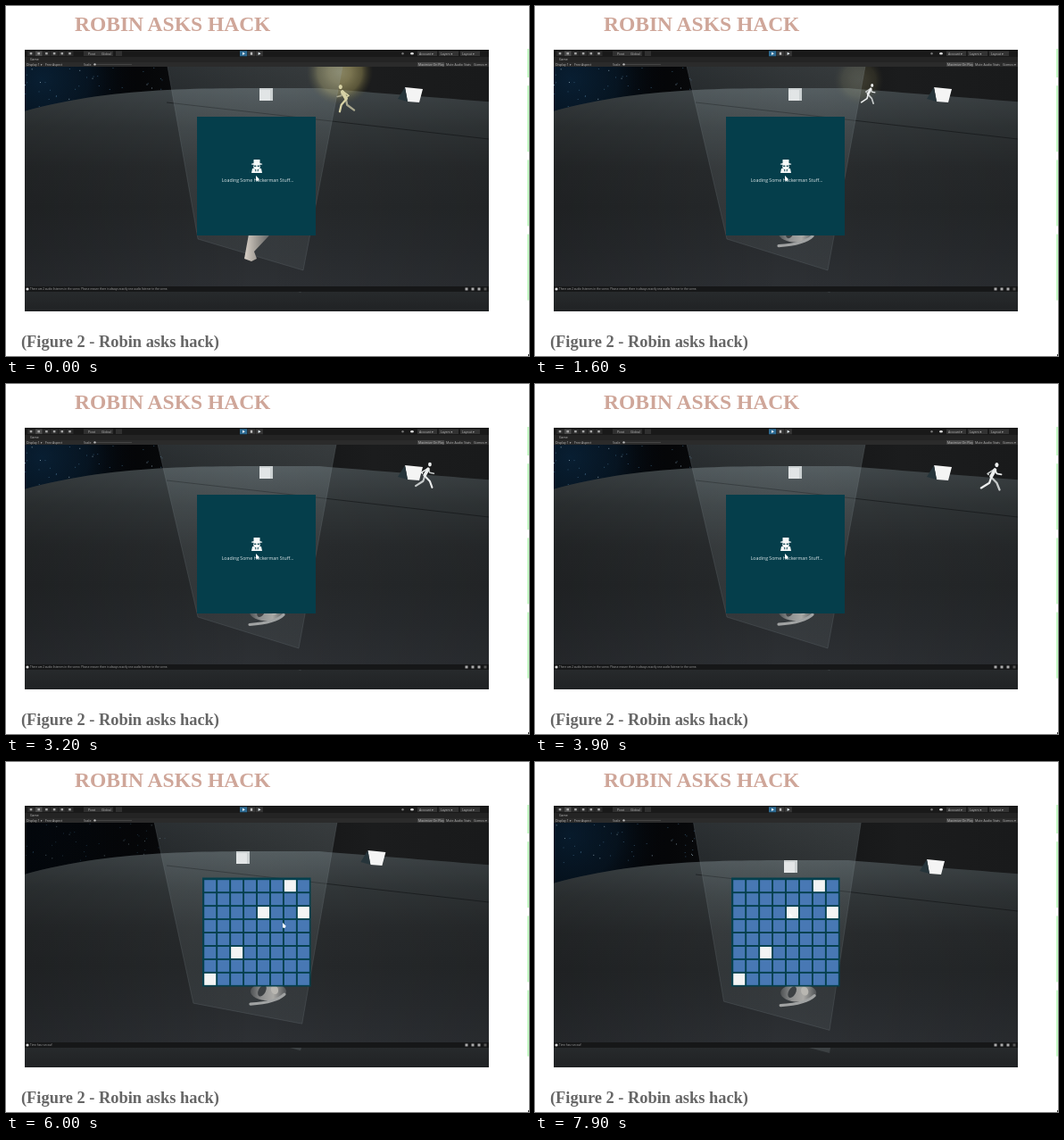
Write an HTML page with a canvas that moves like this. It is 586 px wide and 392 px high and loops after 8 s.

```html
<!DOCTYPE html>
<html lang="en">
<head>
<meta charset="utf-8">
<title>Robin asks hack</title>
<style>
html, body { margin: 0; width: 100%; height: 100%; overflow: hidden; background: #fff; }
canvas { position: absolute; left: 0; top: 0; }
h1, p {
  position: absolute; margin: 0; white-space: nowrap; line-height: 1;
  font-family: "Liberation Serif", Times, serif; font-weight: bold;
}
h1 { left: 77px; top: 8.5px; font-size: 23.5px; color: #cfa699; }
p { left: 17px; top: 366.5px; font-size: 18.4px; color: #666; }
</style>
</head>
<body>
<canvas id="stage" width="586" height="392"></canvas>
<h1>ROBIN ASKS HACK</h1>
<p>(Figure 2 - Robin asks hack)</p>
<script>
const ctx = document.getElementById('stage').getContext('2d');
const LOOP = 8000, GRID_AT = 4900, LEFT = 21, RIGHT = 541, TOP = 68, BOTTOM = 314;
const LIT = ['6,0', '4,2', '7,2', '2,5', '0,7'];
const GREY = '#bdbdbd';

const clamp = v => Math.max(0, Math.min(1, v));

// Eased progress from 0 to 1 between two times
function span(t, from, to) {
  const v = clamp((t - from) / (to - from));
  return v * v * (3 - 2 * v);
}

function rect(x, y, w, h, color) {
  ctx.fillStyle = color;
  ctx.fillRect(x, y, w, h);
}

function trace(points) {
  ctx.beginPath();
  points.forEach(([x, y]) => ctx.lineTo(x, y));
}

function poly(points, fill) {
  trace(points);
  ctx.fillStyle = fill;
  ctx.fill();
}

function line(points, color, width = 1) {
  trace(points);
  ctx.strokeStyle = color;
  ctx.lineWidth = width;
  ctx.stroke();
}

function oval(x, y, rx, ry, fill, turn = 0) {
  ctx.beginPath();
  ctx.ellipse(x, y, rx, ry, turn, 0, 7);
  ctx.fillStyle = fill;
  ctx.fill();
}

function stops(gradient, colors) {
  colors.forEach((c, i) => gradient.addColorStop(i / (colors.length - 1), c));
  return gradient;
}
const down = (y0, y1, ...colors) => stops(ctx.createLinearGradient(0, y0, 0, y1), colors);
const across = (x0, x1, ...colors) => stops(ctx.createLinearGradient(x0, 0, x1, 0), colors);
const halo = (x, y, r, ...colors) => stops(ctx.createRadialGradient(x, y, 0, x, y, r), colors);

function label(text, x, y, size = 3.5, color = GREY) {
  ctx.font = `${size}px "Open Sans", "Noto Sans", sans-serif`;
  ctx.fillStyle = color;
  ctx.fillText(text, x, y);
}

function view(t) {
  const a = span(t, 5300, 6000), b = span(t, 6000, 7900);
  return {
    pan: 21 * b - 26 * a,
    tilt: 8 * a + 10 * b,
    swing: 1 - span(t, 0, 900),
    nebula: 0.65 - 0.6 * a + 0.5 * b,
    mouse: [281 + 30 * a - 25 * b, 193 - 10 * a - 11 * b]
  };
}

function drawSky({ pan, nebula }) {
  rect(LEFT, TOP, 520, 75, across(LEFT, RIGHT, '#020509', '#050608', '#111213', '#1b1c1d', '#191a1b'));
  ctx.globalAlpha = nebula;
  rect(LEFT, TOP, 165, 70, halo(40, 82, 105, '#0c2c48', '#081c2e', 'rgba(2,6,12,0)'));
  ctx.globalAlpha = 0.4 + 0.5 * nebula;
  let seed = 11;
  const rnd = () => (seed = seed * 16807 % 2147483647) / 2147483647;
  for (let i = 0; i < 45; i++) {
    const x = LEFT + (rnd() * 160 + pan + 160) % 160;
    rect(x, TOP + rnd() * 45, 1, 1, i % 4 ? '#3f6683' : '#a3bdcc');
  }
  ctx.globalAlpha = 1;
}

function drawGround({ tilt }) {
  const horizon = x => 92 + tilt + 26 * Math.max(0, (300 - x) / 280) ** 3 + Math.max(0, x - 350) * 0.08;
  const edge = [];
  for (let x = LEFT; x <= RIGHT; x += 10) edge.push([x, horizon(x)]);
  const shape = [...edge, [RIGHT, BOTTOM], [LEFT, BOTTOM]];
  poly(shape, down(92 + tilt, BOTTOM, '#434a4d', '#323739', '#292c2e', '#26292b', '#292c2f', '#2d3034'));
  poly(shape, across(LEFT, RIGHT, 'rgba(0,0,0,.2)', 'rgba(0,0,0,0)', 'rgba(0,0,0,.12)'));
  line([[180, 108 + tilt], [RIGHT, 149 + tilt]], 'rgba(14,16,18,.55)');
}

function drawGlow(t) {
  const grow = span(t, 0, 900), x = 374 - 11 * grow, y = 74 + 9 * grow, r = 37 - 9 * grow;
  ctx.globalAlpha = (0.5 + 0.5 * grow) * (1 - span(t, 1000, 1800));
  oval(x, y, r, r, halo(x, y, r, '#f8f0ac', '#dccf86', 'rgba(176,164,96,.85)', 'rgba(90,84,45,0)'));
  ctx.globalAlpha = 1;
}

function drawCubes({ pan, tilt }) {
  const x = 291 + pan, y = 99 + tilt, fx = 453 + pan * 1.6, fy = 99 + tilt;
  rect(x - 7, y - 7, 15, 14, '#dcdfdf');
  rect(x - 7, y - 5, 12, 12, '#f8f8f8');
  const top = [fx - 6, fy - 8], foot = [fx - 3, fy + 8];
  poly([top, [fx + 14, fy - 6], [fx + 10, fy + 9], foot], '#f4f4f4');
  poly([top, foot, [fx - 14, fy + 5]], '#26343a');
}

function drawRunner(t) {
  const away = Math.max(0, t - 1430), turn = span(t, 0, 900);
  const near = Math.max(1 - turn, clamp(away / 2400));
  const x = 381 - 18 * turn + away * 0.06, y = 109 + 10 * near;
  const u = (22 + 9 * near) / 30, dir = away ? 1 : -1;
  const p = (dx, dy) => [x + dx * u * dir, y - dy * u];
  const step = Math.sin(t * 0.01387 + 0.9);
  const lit = t < 1300, skin = lit ? '#d8d3a6' : '#eceeee', shade = lit ? '#a9a78e' : '#c6caca';
  ctx.lineCap = ctx.lineJoin = 'round';
  for (const side of [-1, 1]) {
    const s = side * step, tone = side < 0 ? shade : skin;
    line([p(0, 14), p(4 * s + 2, 8), p(10 * s - 1, 1.5 - s)], tone, 2.2 * u);
    line([p(4, 23), p(1 - 5 * s, 18), p(4 - 7 * s, 17)], tone, 1.6 * u);
  }
  line([p(0, 15), p(4, 22)], skin, 3.8 * u);
  oval(...p(6, 27.5), 2 * u, 2.5 * u, skin);
  ctx.lineCap = 'butt';
  ctx.lineJoin = 'miter';
}

function drawBeam({ pan, tilt, swing }) {
  const shape = [
    [170 + 0.3 * pan + 0.5 * tilt + 11 * swing, TOP],
    [215 + 0.15 * (pan - tilt), 261 - 0.25 * pan + 0.33 * tilt],
    [328 - 0.12 * pan + 0.08 * tilt + 5 * swing, 296 + 0.2 * pan + 0.3 * tilt],
    [370 - 0.13 * pan - 0.3 * tilt + 7 * swing, TOP]
  ];
  poly(shape, down(TOP, 300, 'rgba(150,165,170,.25)', 'rgba(140,154,158,.15)', 'rgba(130,142,146,.13)'));
  line(shape, 'rgba(160,176,180,.18)', 0.8);
}

function drawBody(t, { tilt }) {
  const slide = span(t, 100, 600);
  ctx.save();
  if (slide < 1) {
    const y = -34 * slide;
    poly([[273, 250 + y], [299, 250 + y], [294, 258 + y], [278, 275 + y], [281, 283 + y],
      [275, 286 + y], [267, 283 + y]], across(268, 296, '#d5cdc4', '#9a9690', '#606264'));
  }
  ctx.translate(292 + tilt * 0.12, 259 + tilt * 0.2 - 28 * (1 - slide) + Math.sin(t / 420) * 0.5);
  oval(1, -4, 20, 10, across(-20, 20, '#4a4d4f', '#8e8f8f', '#a9a8a5', '#55585a'));
  oval(-6, -5, 4, 7, '#3d4144', 0.5);
  oval(8, -6, 4, 5, '#b9b7b2', -0.4);
  ctx.beginPath();
  ctx.moveTo(-19, 10);
  ctx.quadraticCurveTo(10, 8, 19, -1);
  ctx.strokeStyle = '#a0a2a2';
  ctx.lineWidth = 3.2;
  ctx.lineCap = 'round';
  ctx.stroke();
  ctx.restore();
}

function drawAgent(x, y) {
  const white = '#f7f9f9', dark = '#053d4a';
  rect(x - 3.5, y - 7, 7, 5, white);
  oval(x, y - 2, 6.4, 1.2, white);
  oval(x, y + 1, 3.8, 3.5, white);
  poly([[x - 6, y + 8], [x - 5, y + 3], [x + 5, y + 3], [x + 6, y + 8]], white);
  for (const side of [-1, 1]) {
    oval(x + side * 1.8, y + 0.3, 1.3, 0.8, dark);
    poly([[x + side * 2.4, y + 3.5], [x + side * 0.6, y + 4.4], [x + side, y + 7]], dark);
  }
}

function drawPanel(t) {
  if (t < GRID_AT) {
    rect(214, 124, 133, 133, '#053e4b');
    drawAgent(281, 179);
    ctx.textAlign = 'center';
    label('Loading Some Hackerman Stuff...', 282, 196.5, 5.22, '#dfe8ea');
    ctx.textAlign = 'left';
    return;
  }
  rect(220, 129.5, 121.5, 122, '#05404e');
  for (let i = 0; i < 64; i++) {
    const col = i % 8, row = i >> 3, order = LIT.indexOf(`${col},${row}`);
    const on = order >= 0 && t >= 5500 + order * 100;
    rect(222.2 + col * 14.95, 132.2 + row * 14.95, 13, 13, on ? '#f3f4f4' : '#4878b4');
  }
}

function drawMouse([x, y]) {
  poly([[x - 1, y - 3], [x - 1, y + 2.5], [x + 1.5, y + 3], [x + 2.7, y + 0.8]], '#fff');
}

function drawToolbar() {
  rect(LEFT, 49, 520, 19, '#191919');
  rect(LEFT, 57, 520, 5.5, '#242424');
  rect(LEFT, 62.5, 520, 5.5, '#2b2b2b');
  for (let i = 0; i < 6; i++) {
    const x = 24 + i * 8.7;
    rect(x, 50.5, 8, 5.5, i === 1 ? '#4a4a4a' : '#2b2b2b');
    rect(x + 2.7, 52, 2.6, 2.4, '#a5a5a5');
  }
  for (let i = 0; i < 3; i++) {
    const x = 262 + i * 8.8;
    rect(x, 50.3, 8.3, 6, i ? '#353535' : '#2d6a92');
    if (i === 1) rect(x + 3, 51.8, 2.4, 3, GREY);
    else poly([[x + 3, 51.7], [x + 6, 53.3], [x + 3, 54.9]], '#e6f0f5');
  }
  rect(87, 50.5, 33, 5.5, '#303030');
  rect(123, 50.5, 7, 5.5, '#303030');
  oval(444.5, 53.3, 1.2, 1.2, '#777');
  oval(455, 53.3, 1.9, 1.3, '#ddd');
  ['Account', 'Layers', 'Layout'].forEach((name, i) => {
    const x = 461 + i * 24;
    rect(x, 50.5, 22, 5.5, '#333');
    label(name + ' ▾', x + 2, 54.7);
  });
  label('Pivot', 92, 54.7);
  label('Global', 107, 54.7);
  label('Game', 27, 61.2);
  label('Display 1 ▾', 23, 66.5);
  label('Free Aspect', 44, 66.5);
  label('Scale', 87, 66.5);
  rect(98, 65.2, 43, 0.6, '#555');
  oval(99.5, 65.4, 1.2, 1.2, '#bbb');
  rect(461, 63, 30, 4.6, '#484848');
  label('Maximize On Play', 462, 66.5);
  label('Mute Audio', 493, 66.5);
  label('Stats', 513, 66.5);
  label('Gizmos ▾', 524, 66.5);
}

function drawStatus(t, { tilt }) {
  rect(LEFT, BOTTOM, 520, 6, '#161718');
  oval(24, 317, 1.6, 1.6, '#d8d8d8');
  const text = t < GRID_AT
    ? 'There are 2 audio listeners in the scene. Please ensure there is always exactly one audio listener in the scene.'
    : 'Time has run out!';
  label(text, 27, 318.2, 3.05, '#a6a6a6');
  for (let i = 0; i < 4; i++) rect(514.5 + i * 7, 315.5, 3, 3, i < 3 ? '#a9a9a9' : '#555');
  rect(LEFT, 320, 520, 22, down(320, 342, '#272a2c', '#202224'));
  const tail = 1 + tilt * 0.28;
  poly([[331 - tail * 4, 320], [330, 320 + tail], [331, 320]], 'rgba(140,152,156,.22)');
}

function drawPage() {
  rect(0, 0, 586, 392, '#fff');
  for (let y = 6; y < 300; y += 83.2) rect(584, y, 2, 74, '#c5fac5');
  rect(584, 0, 2, 48, '#fff');
  rect(585, 390, 1, 2, '#333');
}

function draw(t) {
  const cam = view(t);
  drawPage();
  ctx.save();
  ctx.beginPath();
  ctx.rect(LEFT, TOP, RIGHT - LEFT, BOTTOM - TOP);
  ctx.clip();
  drawSky(cam);
  drawGround(cam);
  drawGlow(t);
  drawCubes(cam);
  drawRunner(t);
  drawBeam(cam);
  drawBody(t, cam);
  drawPanel(t);
  drawMouse(cam.mouse);
  ctx.restore();
  drawToolbar();
  drawStatus(t, cam);
}

function tick(now) {
  draw(Math.floor(now % LOOP / 100) * 100);
  requestAnimationFrame(tick);
}
draw(0);
requestAnimationFrame(tick);
</script>
</body>
</html>
```
